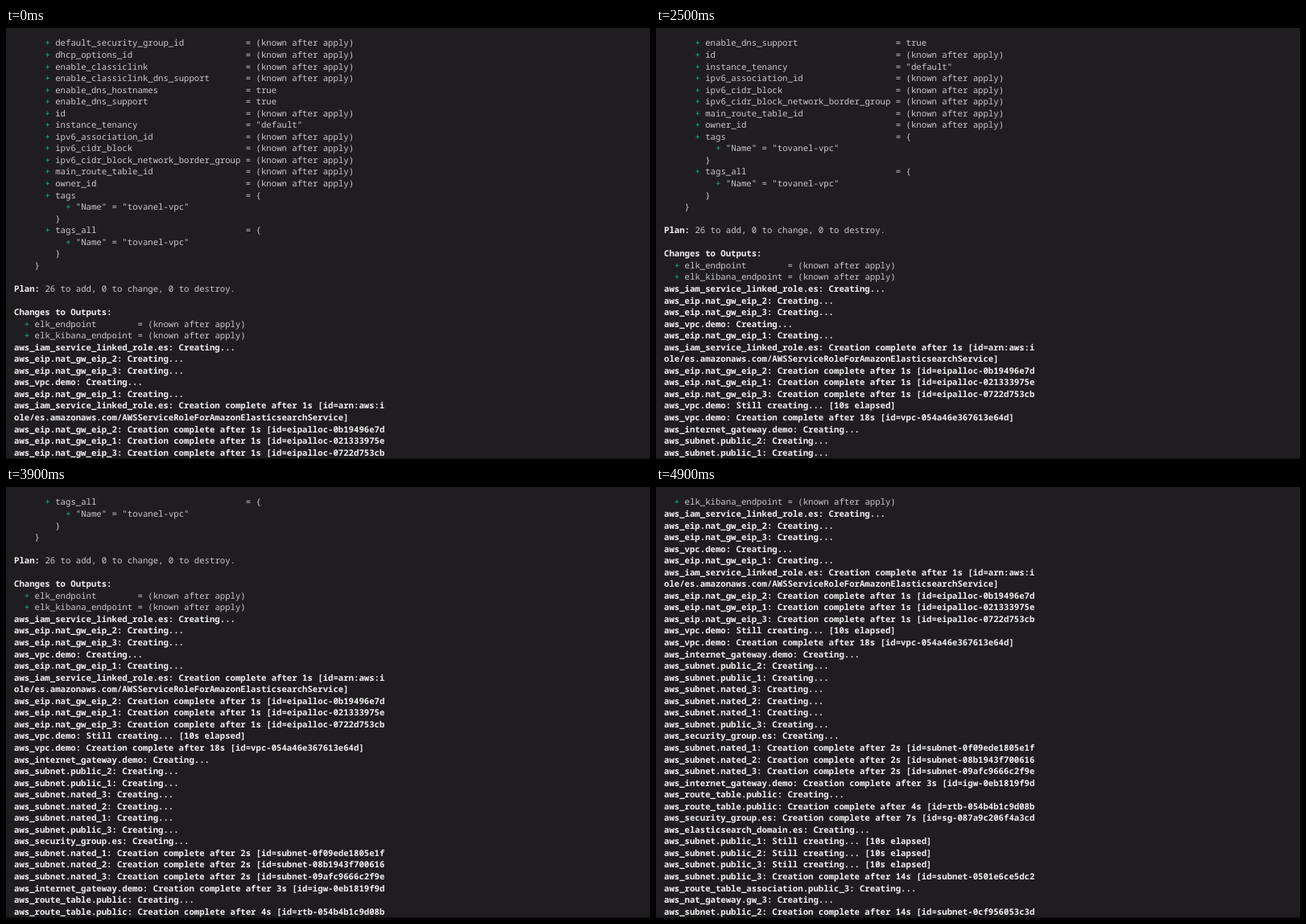
Recreate the animation shown at these times as an HTML page with a canvas. Size 800 by 536 pixels, loop 5000 ms.

```html
<!DOCTYPE html>
<html lang="en">
<head>
<meta charset="utf-8">
<title>Terminal apply log</title>
<style>
  html, body { margin: 0; width: 100%; height: 100%; overflow: hidden; background: #1f1d20; }
  canvas { display: block; width: 800px; height: 536px; }
</style>
</head>
<body>
<canvas id="stage" width="800" height="536"></canvas>
<script>
const LOOP = 5000, ROWS = 36, PITCH = 14.55, CHAR = 6.4, LEFT = 10, BASELINE = 22.4;
const FONT = '10.67px "Noto Sans Mono", "DejaVu Sans Mono", monospace';
const GREEN = '#18b878', PLAIN = '#cbcaca', BRIGHT = '#f2f1f1';

const unknown = '(known after apply)';
const attr = (name, value = unknown) => '      + ' + name.padEnd(36) + ' = ' + value;
const tagBlock = name => [attr(name, '{'), '          + "Name" = "tovanel-vpc"', '        }'];
const creating = name => `${name}: Creating...`;
const still = name => `${name}: Still creating... [10s elapsed]`;
const done = (name, secs, id) => `${name}: Creation complete after ${secs}s [id=${id}`;

const plan = [
  attr('default_security_group_id'),
  attr('dhcp_options_id'),
  attr('enable_classiclink'),
  attr('enable_classiclink_dns_support'),
  attr('enable_dns_hostnames', 'true'),
  attr('enable_dns_support', 'true'),
  attr('id'),
  attr('instance_tenancy', '"default"'),
  attr('ipv6_association_id'),
  attr('ipv6_cidr_block'),
  attr('ipv6_cidr_block_network_border_group'),
  attr('main_route_table_id'),
  attr('owner_id'),
  ...tagBlock('tags'),
  ...tagBlock('tags_all'),
  '    }',
  '',
  'Plan: 26 to add, 0 to change, 0 to destroy.',
  '',
  'Changes to Outputs:',
  '  + elk_endpoint        = ' + unknown,
  '  + elk_kibana_endpoint = ' + unknown,
];

const log = [
  creating('aws_iam_service_linked_role.es'),
  creating('aws_eip.nat_gw_eip_2'),
  creating('aws_eip.nat_gw_eip_3'),
  creating('aws_vpc.demo'),
  creating('aws_eip.nat_gw_eip_1'),
  done('aws_iam_service_linked_role.es', 1, 'arn:aws:i'),
  'ole/es.amazonaws.com/AWSServiceRoleForAmazonElasticsearchService]',
  done('aws_eip.nat_gw_eip_2', 1, 'eipalloc-0b19496e7d'),
  done('aws_eip.nat_gw_eip_1', 1, 'eipalloc-021333975e'),
  done('aws_eip.nat_gw_eip_3', 1, 'eipalloc-0722d753cb'),
  still('aws_vpc.demo'),
  done('aws_vpc.demo', 18, 'vpc-054a46e367613e64d]'),
  creating('aws_internet_gateway.demo'),
  ...['public_2', 'public_1', 'nated_3', 'nated_2', 'nated_1', 'public_3']
    .map(name => creating('aws_subnet.' + name)),
  creating('aws_security_group.es'),
  done('aws_subnet.nated_1', 2, 'subnet-0f09ede1805e1f'),
  done('aws_subnet.nated_2', 2, 'subnet-08b1943f700616'),
  done('aws_subnet.nated_3', 2, 'subnet-09afc9666c2f9e'),
  done('aws_internet_gateway.demo', 3, 'igw-0eb1819f9d'),
  creating('aws_route_table.public'),
  done('aws_route_table.public', 4, 'rtb-054b4b1c9d08b'),
  done('aws_security_group.es', 7, 'sg-087a9c206f4a3cd'),
  creating('aws_elasticsearch_domain.es'),
  ...[1, 2, 3].map(n => still('aws_subnet.public_' + n)),
  done('aws_subnet.public_3', 14, 'subnet-0501e6ce5dc2'),
  creating('aws_route_table_association.public_3'),
  creating('aws_nat_gateway.gw_3'),
  done('aws_subnet.public_2', 14, 'subnet-0cf956053c3d'),
];

const lines = [...plan, ...log];

// Each entry: time in ms, lines scrolled off the top from then on.
const scrolls = [
  [0, 0], [1300, 1], [1800, 2], [2200, 3], [2400, 4], [2500, 5], [2600, 6], [2700, 7],
  [2800, 8], [2900, 9], [3000, 10], [3100, 11], [3200, 12], [3600, 15], [3900, 16],
  [4000, 17], [4100, 18], [4400, 19], [4500, 20], [4600, 21], [4700, 22], [4800, 24], [4900, 25],
];

const ctx = document.getElementById('stage').getContext('2d');

function put(text, col, y, color, bold) {
  ctx.font = (bold ? 'bold ' : '') + FONT;
  ctx.fillStyle = color;
  ctx.fillText(text, LEFT + col * CHAR, y);
}

function drawLine(index, y) {
  const line = lines[index];
  if (index >= plan.length) return put(line, 0, y, BRIGHT, true);
  const [, indent, plus, heading, rest] = line.match(/^( *)(\+?)((?:Plan|Changes to Outputs):)?(.*)$/);
  let col = indent.length;
  if (plus) put(plus, col++, y, GREEN);
  if (heading) {
    put(heading, col, y, BRIGHT, true);
    col += heading.length;
  }
  put(rest, col, y, PLAIN);
}

function draw(top) {
  ctx.fillStyle = '#1f1d20';
  ctx.fillRect(0, 0, 800, 536);
  ctx.fillStyle = '#171518';
  ctx.fillRect(0, 534, 800, 2);
  ctx.textRendering = 'geometricPrecision';
  for (let row = 0; row < ROWS; row++) drawLine(top + row, BASELINE + row * PITCH);
}

let shown = -1;
function tick() {
  const time = performance.now() % LOOP;
  const top = scrolls.findLast(([start]) => start <= time)[1];
  if (top !== shown) draw(shown = top);
  requestAnimationFrame(tick);
}
tick();
</script>
</body>
</html>
```
